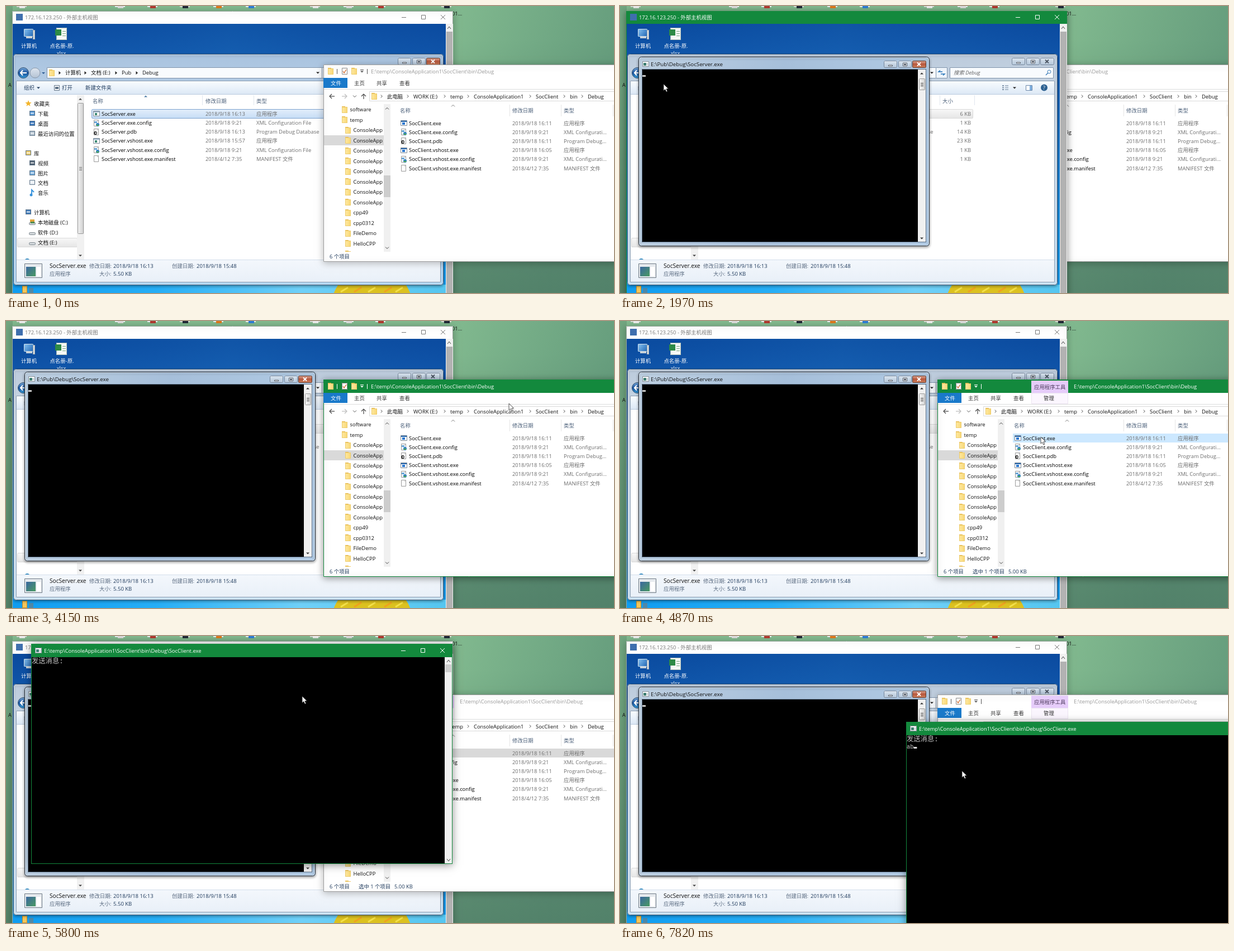
Write an HTML page with a canvas that moves like this. It is 1088 px wide and 515 px high and loops after 8000 ms.

```html
<!DOCTYPE html>
<html lang="zh-CN">
<head>
<meta charset="utf-8">
<style>
  html, body { margin: 0; width: 100%; height: 100%; overflow: hidden; background: #649a7a; }
  canvas { display: block; }
</style>
</head>
<body>
<canvas id="stage" width="1088" height="515"></canvas>
<script>
const ctx = document.getElementById('stage').getContext('2d');
const LOOP = 8000, GREEN = '#13893d';
const UI = '"Open Sans","Noto Sans CJK SC","Noto Sans CJK",sans-serif';
const MONO = '"Liberation Mono","Noto Sans CJK SC","Noto Sans CJK",monospace';

// ---- drawing helpers ----
function rect(x, y, w, h, fill, stroke, radius = 0) {
  const path = o => { ctx.beginPath(); ctx.roundRect(x + o, y + o, w - 2 * o, h - 2 * o, radius); };
  if (fill) { ctx.fillStyle = fill; path(0); ctx.fill(); }
  if (stroke) { ctx.strokeStyle = stroke; ctx.lineWidth = 1; path(.5); ctx.stroke(); }
}
function grad(x0, y0, x1, y1, ...colors) {
  const g = ctx.createLinearGradient(x0, y0, x1, y1);
  colors.forEach((c, i) => g.addColorStop(i / (colors.length - 1), c));
  return g;
}
function text(s, x, y, color = '#000', size = 9.4, align = 'left', font = UI, style = '') {
  ctx.font = `${style} ${size}px ${font}`;
  ctx.textAlign = align;
  ctx.fillStyle = color;
  ctx.fillText(s, x, y);
}
function line(color, width, ...p) {
  ctx.strokeStyle = color; ctx.lineWidth = width;
  ctx.beginPath();
  for (let i = 0; i < p.length; i += 2) ctx.lineTo(p[i], p[i + 1]);
  ctx.stroke();
}
function poly(color, ...p) {
  ctx.fillStyle = color;
  ctx.beginPath();
  for (let i = 0; i < p.length; i += 2) ctx.lineTo(p[i], p[i + 1]);
  ctx.fill();
}
function disc(x, y, r, fill, stroke) {
  ctx.beginPath(); ctx.arc(x, y, r, 0, 7);
  if (fill) { ctx.fillStyle = fill; ctx.fill(); }
  if (stroke) { ctx.strokeStyle = stroke; ctx.lineWidth = 1; ctx.stroke(); }
}
const down = (x, y, c = '#222', r = 3) => poly(c, x - r, y - r / 2, x + r, y - r / 2, x, y + r / 2);
const up = (x, y, c = '#222', r = 3) => poly(c, x - r, y + r / 2, x + r, y + r / 2, x, y - r / 2);
const right = (x, y, c = '#222') => poly(c, x - 1.5, y - 3, x + 2, y, x - 1.5, y + 3);
const chevron = (x, y, dx, dy, c = '#555') => dx
  ? line(c, 1, x - dx, y - 2.5, x + dx, y, x - dx, y + 2.5)
  : line(c, 1, x - 3, y - dy, x, y + dy, x + 3, y - dy);
function shadowed(blur, alpha, draw) {
  ctx.save();
  ctx.shadowColor = `rgba(0,0,0,${alpha})`; ctx.shadowBlur = blur; ctx.shadowOffsetY = 2;
  draw();
  ctx.restore();
}
function clipped(x, y, w, h, draw) {
  ctx.save();
  ctx.beginPath(); ctx.rect(x, y, w, h); ctx.clip();
  draw();
  ctx.restore();
}

// ---- small icons, centred vertically on y ----
function folder(x, y) {
  rect(x, y - 6, 6, 4, '#e8b84a');
  rect(x, y - 5, 10, 11, grad(x, 0, x + 10, 0, '#ffe9a2', '#f8d775'), '#eccb6b');
}
function page(x, y) {
  rect(x + 1, y - 6, 9, 12, '#fff', '#9a9a9a');
  poly('#ccc', x + 7, y - 6, x + 10, y - 3, x + 7, y - 3);
}
const fileIcons = {
  exe(x, y, modern) {
    rect(x, y - 5, 12, 10, '#fff', '#7b8794');
    rect(x + 1, y - 4, 10, 2, modern ? '#2a6ab0' : '#9db4c8');
    rect(x + 3, y - 1, modern ? 5 : 4, 4, modern ? '#2b78d0' : '#3d8a74');
  },
  config(x, y) {
    page(x, y);
    rect(x + 2, y - 3, 5, 3, '#6aa6d8');
    disc(x + 8, y + 3, 3, '#2c7fc0');
    rect(x + 6, y + 3, 4, 2, '#5bb04d');
  },
  pdb(x, y) { page(x, y); disc(x + 4, y + 2, 3, '#333'); rect(x + 3, y + 1, 3, 2, '#ddd'); },
  file: page
};
function consoleIcon(x, y) {
  rect(x, y, 12, 10, '#fff', '#7a8791');
  rect(x + 2, y + 3, 5, 5, '#3f7f73');
  rect(x + 8, y + 3, 2, 5, '#c3cbd0');
}
const fileKinds = ['exe', 'config', 'pdb', 'exe', 'config', 'file'];
const fileEnds = ['.exe', '.exe.config', '.pdb', '.vshost.exe', '.vshost.exe.config', '.vshost.exe.manifest'];
const fileDates = (built, host) => [built, '9:21', built, host, '9:21', '7:35']
  .map((s, i) => `2018/${i == 5 ? '4/12' : '9/18'} ${s}`);
const rowY = (first, i) => first + i * 16.2;

// ---- desktop behind everything ----
function desktop() {
  rect(0, 0, 1088, 515, grad(780, 0, 1088, 90, '#83bb90', '#669d7d'));
  rect(0, 0, 1088, 515, grad(0, 60, 0, 515, 'rgba(70,115,92,0)', 'rgba(74,118,98,.7)'));
  rect(0, 0, 12, 515, 'rgba(60,105,80,.25)');
  [28, 204, 262, 320, 380, 438, 553, 613, 670, 788].forEach((x, i) => {
    rect(x - 9, 0, 18, 2, i % 3 ? '#e9eef0' : '#d6d9d2');
    rect(x - 4, 0, 10, 4, ['#eee', '#ddd', '#b23a30', '#222a38', '#e07a1c', '#2f7fd8'][i % 6]);
  });
  text('A', 4, 145, '#111', 9);
  text('01...', 798, 17, '#111', 9.4);
}

// ---- remote session ----
function glassButtons(x, y, active, step = 25.7) {
  for (let i = 0; i < 3; i++) {
    const close = i == 2, bx = Math.round(x + i * step), hot = close && active;
    rect(bx, y, close ? 25 : 24, 13,
      hot ? grad(0, y, 0, y + 13, '#dcaa98', '#b8573c', '#cf8460') : grad(0, y, 0, y + 13, '#dbe5ef', '#b3c6da'),
      hot ? '#5a3a30' : '#76869a', 2);
    const cx = bx + 12, cy = y + 6.5, c = hot ? '#fff' : '#4b5563';
    if (i == 0) rect(cx - 4, cy + 1, 8, 3, '#fff', c);
    if (i == 1) { rect(cx - 4, cy - 3, 8, 7, '#fff', c); rect(cx - 2, cy - 1, 4, 3, c); }
    if (close) { line(c, 1.8, cx - 3, cy - 3, cx + 3, cy + 3); line(c, 1.8, cx + 3, cy - 3, cx - 3, cy + 3); }
  }
}
function remoteDesktop() {
  rect(12, 32, 775, 483, grad(0, 32, 0, 515, '#0a4a9e', '#1560b4', '#1a7fd2', '#1796e6', '#12a2f4'));
  rect(12, 32, 775, 483, grad(12, 0, 787, 0, 'rgba(40,130,220,0)', 'rgba(60,160,230,.12)', 'rgba(20,80,170,.1)'));
  rect(12, 500, 775, 15, grad(12, 0, 787, 0, '#0f9cf0', '#26aef6', '#6fd0f8', '#55c6f0'));
  disc(655, 541, 73, '#dcc11f');
  [606, 630, 655, 684, 704].forEach((x, i) => line(i % 2 ? '#f0a020' : '#f3e04a', 3, x - 7, 513, x + 6, 505));
  rect(29, 502, 9, 13, '#f4c65a', '#c98b22'); rect(41, 506, 8, 9, '#4d88a8');
  // icons
  rect(32, 41, 17, 14, grad(32, 41, 49, 55, '#8cc6f2', '#1d64b4'), '#d9e3ea', 1);
  rect(36, 55, 11, 3, '#c9d2d8'); rect(48, 43, 4, 17, '#dfe5e8', '#9aa5ad');
  rect(90, 39, 19, 22, '#f6f8f6', '#b4c2b4'); rect(88, 42, 11, 11, '#2d8a46');
  [45, 49, 53].forEach(y => rect(101, y, 6, 1, '#79a983'));
  text('计算机', 41, 75, '#fff', 9.4, 'center');
  text('点名册-原.', 100, 75, '#fff', 9.4, 'center');
  text('xlsx', 99, 88, '#fff', 9.4, 'center');
}
const places = [
  [0, 175, '收藏夹', '#f3b52c'], [1, 193, '下载', '#4a8fd0'], [1, 211, '桌面', '#2f6fb8'], [1, 229, '最近访问的位置', '#a9b9c8'],
  [0, 264, '库', '#e7c560'], [1, 282, '视频', '#4a5b6c'], [1, 300, '图片', '#6aa5d8'], [1, 317, '文档', '#dfe7ee'],
  [1, 335, '音乐', '#3b95dd'], [0, 370, '计算机', '#3d78b8'], [1, 388, '本地磁盘 (C:)', '#8b98a3'],
  [1, 406, '软件 (D:)', '#b8bec4'], [1, 424, '文档 (E:)', '#b8bec4']
];
function placeIcon(x, y, name, color) {
  if (name == '收藏夹') {
    ctx.fillStyle = color; ctx.beginPath();
    for (let i = 0; i < 10; i++) {
      const r = i % 2 ? 2.6 : 6, a = i * Math.PI / 5 - Math.PI / 2;
      ctx.lineTo(x + 6 + r * Math.cos(a), y + r * Math.sin(a));
    }
    ctx.fill();
  } else if (name == '音乐') {
    line(color, 2, x + 5, y + 4, x + 5, y - 5, x + 9, y - 1); disc(x + 4, y + 4, 2.5, color);
  } else if (/:\)/.test(name)) {
    rect(x, y, 12, 5, '#d5dadd', '#7f8990', 2);
    if (name[0] == '本') { rect(x + 2, y - 5, 8, 5, '#e0a53a'); rect(x + 3, y - 1, 7, 3, '#4f8b4f'); }
  } else {
    rect(x + 1, y - 5, 10, 9, color, '#65798b'); rect(x + 3, y - 2, 6, 3, 'rgba(255,255,255,.6)');
  }
}
function serverFolder(active) {
  shadowed(4, .3, () => rect(13, 86, 770, 415,
    active ? grad(0, 86, 0, 501, '#a9c3df', '#c3d8ed', '#bcd8f2', '#b4d8f5')
           : grad(0, 86, 0, 501, '#bccbdc', '#d3dfeb', '#d0e2f2', '#cbe3f5'), '#3d5a78', 5));
  rect(14, 87, 768, 413, null, 'rgba(255,255,255,.4)', 4);
  glassButtons(701, 93, active);
  // navigation
  disc(31, 120, 9.5, grad(0, 110, 0, 130, '#7fb0e0', '#174f9a', '#3aa0dc'), '#345170');
  line('#fff', 2.2, 37, 120, 26, 120); line('#fff', 2.2, 30, 115.5, 26, 120, 30, 124.5);
  disc(52, 120, 9, grad(0, 110, 0, 130, '#dfe7f0', '#b2c1d2'), '#8897a9');
  down(67, 120.5, '#2a5a92');
  rect(73, 110, 493, 20, '#f8fbfe', '#8094ab');
  rect(565, 110, 21, 20, '#eef4fa', '#8094ab');
  folder(77, 120);
  [['计算机', 106], ['文档 (E:)', 152], ['Pub', 207], ['Debug', 244]].forEach(([s, x]) => {
    right(x - 10, 120); text(s, x, 123, '#111');
  });
  down(558, 120);
  line('#2372b8', 1.4, 577, 118, 570, 118, 573, 115.5); line('#2372b8', 1.4, 574, 122, 581, 122, 578, 124.5);
  rect(590, 110, 186, 20, '#f8fbfe', '#8094ab');
  text('搜索 Debug', 597, 123, '#666', 9.4, 'left', UI, 'italic');
  disc(768, 118, 3, null, '#3b7cb8'); line('#3b7cb8', 1.5, 766, 120, 762, 124);
  // command bar
  rect(18, 134, 760, 362, '#fff', '#8c9db0');
  rect(19, 135, 758, 24, grad(0, 135, 0, 159, '#f8fbfe', '#eaf2fa', '#dbe7f4'));
  rect(19, 158, 758, 1, '#b9cade');
  text('组织', 32, 150, '#1e395b'); down(58, 147, '#1e395b');
  rect(86, 142, 10, 10, '#fff', '#5c7085'); rect(88, 145, 6, 4, '#5c7085');
  text('打开', 100, 150, '#1e395b'); text('新建文件夹', 142, 150, '#1e395b');
  for (let i = 0; i < 3; i++) { rect(684, 142 + i * 3.5, 3, 2, '#8195aa'); rect(689, 142 + i * 3.5, 6, 2, '#a9b8c8'); }
  down(706, 147, '#222'); rect(726, 142, 12, 10, '#fff', '#6a87a8'); rect(733, 143, 4, 8, '#7fb0e0');
  disc(759, 146.5, 6, '#2d6191'); text('?', 759, 150, '#fff', 9, 'center');
  // places
  rect(20, 416, 108, 17, grad(0, 416, 0, 433, '#f8f8f8', '#e5e5e5'), '#d9d9d9', 2);
  places.forEach(([deep, y, name, color]) => {
    placeIcon(deep ? 41 : 34, y, name, color);
    text(name, deep ? 57 : 50, y + 3.5, '#111');
  });
  disc(38, 458, 5, '#3c8fc4'); rect(32, 455, 14, 10, '#f1f5fb');
  rect(127, 160, 13, 295, '#f1f1f1');
  rect(128, 174, 11, 235, grad(128, 0, 139, 0, '#f4f4f4', '#cfcfcf'), '#989898', 1);
  [289, 291.5, 294].forEach(y => rect(131, y, 5, 1, '#777'));
  up(133, 167, '#444'); down(133, 448, '#444');
  // list
  up(250, 162, '#4d7ba5');
  [351, 443, 572, 634].forEach(x => rect(x, 160, 1, 18, '#e0e6ee'));
  [['名称', 155], ['修改日期', 357], ['类型', 448], ['大小', 577]].forEach(([s, x]) => text(s, x, 174, '#4c607a'));
  rect(153, 185, 479, 17, active ? grad(0, 185, 0, 202, '#e4effb', '#c5dcf5') : grad(0, 185, 0, 202, '#f8f8f8', '#e5e5e5'),
    active ? '#7da2ce' : '#d9d9d9', 2);
  const dates = fileDates('16:13', '15:57');
  const types = ['应用程序', 'XML Configuration File', 'Program Debug Database', '应用程序', 'XML Configuration File', 'MANIFEST 文件'];
  fileEnds.forEach((end, i) => {
    const y = rowY(193.3, i);
    fileIcons[fileKinds[i]](156, Math.round(y));
    text('SocServer' + end, 171, y + 3.5);
    text(dates[i], 357, y + 3.5, '#6d6d6d');
    text(types[i], 448, y + 3.5, '#6d6d6d');
    text([6, 1, 14, 23, 1, 1][i] + ' KB', 628, y + 3.5, '#6d6d6d', 9.4, 'right');
  });
  // details
  rect(19, 456, 758, 39, grad(0, 456, 0, 495, '#f3f7fc', '#e9f0f8'));
  rect(19, 455, 758, 1, '#d3deea');
  rect(33, 462, 32, 26, '#e6eaee', '#6f7a85'); rect(36, 468, 17, 17, grad(36, 468, 53, 485, '#3a67a0', '#4a9a62')); rect(55, 468, 7, 17, '#fff');
  text('SocServer.exe', 78, 469.5, '#111', 10.1);
  text('应用程序', 78, 483.5, '#5a6b80');
  [['修改日期:', 149, 469.5], ['创建日期:', 297, 469.5], ['大小:', 167, 483.5]].forEach(a => text(a[0], a[1], a[2], '#5a6b80'));
  [['2018/9/18 16:13', 192, 469.5], ['2018/9/18 15:48', 341, 469.5], ['5.50 KB', 192, 483.5]].forEach(a => text(a[0], a[1], a[2], '#1e395b', 9.5));
}
function serverConsole() {
  shadowed(4, .35, () => rect(33, 91, 521, 340, grad(33, 91, 554, 150, '#bed0e2', '#a6bfda', '#b0cae4'), '#1d2733', 5));
  rect(34, 92, 519, 338, null, 'rgba(255,255,255,.5)', 4);
  consoleIcon(40, 99);
  text('E:\\Pub\\Debug\\SocServer.exe', 55, 108, '#111', 9.7);
  glassButtons(472, 98, true);
  rect(39, 113, 509, 311, '#000', '#5c6f85');
  rect(533, 114, 14, 309, '#f0f0f0');
  rect(535, 130, 11, 21, grad(535, 0, 546, 0, '#f8f8f8', '#d3d3d3'), '#999', 1);
  [138, 140.5, 143].forEach(y => rect(538, y, 5, 1, '#555'));
  up(540, 121, '#333'); down(540, 417, '#333');
  rect(40, 124, 6, 3, '#c8c8c8');
}
function captionButtons(right, y, color) {
  rect(right - 93, y, 8, 1, color);
  rect(right - 58, y - 4, 8, 8, null, color);
  line(color, 1, right - 23, y - 4, right - 15, y + 4); line(color, 1, right - 15, y - 4, right - 23, y + 4);
}
function remoteWindow(t) {
  const active = t >= 550 && t < 3700, ink = active ? '#fff' : '#777';
  shadowed(12, active ? .4 : .25, () => rect(11, 9, 789, 520, '#fff', active ? GREEN : '#9aa89f'));
  if (active) rect(11, 9, 789, 23, GREEN);
  rect(18, 14, 12, 12, '#3f6fae');
  text('172.16.123.250 - 外部主机视图', 34, 24, ink);
  captionButtons(801, 20, ink);
  rect(787, 32, 13, 483, '#f0f0f0');
  chevron(793, 39, 0, -2, '#444');
  rect(788, 46, 11, 469, '#b2b2b2');
  clipped(12, 32, 775, 483, () => {
    remoteDesktop();
    serverFolder(t < 1570);
    if (t >= 1570) serverConsole();
  });
}

// ---- local file browser ----
function clientFolder(t) {
  const active = t >= 3700 && t < 5180, selected = t >= 4550;
  shadowed(12, active ? .4 : .25, () => rect(568, 105, 540, 354, '#fff', active ? GREEN : '#9d9d9d'));
  if (active) rect(568, 105, 520, 24, GREEN);
  const ink = active ? '#fff' : '#999', tool = active ? '#fff' : '#555';
  folder(576, 117); rect(592, 113, 1, 9, tool);
  rect(601, 111, 10, 12, '#fff', '#888'); line('#d06a2c', 1.3, 603, 117, 605, 120, 609, 114);
  folder(618, 117); down(637, 118, tool); rect(634, 114, 6, 1, tool); rect(646, 113, 1, 9, tool);
  if (selected) {
    rect(736, 107, 66, 22, '#e6ccfa'); rect(736, 129, 66, 20, '#fbf6fe', '#ece4f1');
    text('应用程序工具', 741, 121.5, '#4d3a5c'); text('管理', 758, 142, '#333');
  }
  text('E:\\temp\\ConsoleApplication1\\SocClient\\bin\\Debug', selected ? 812 : 653, 121, ink);
  rect(568, 129, 43, 18, '#1979ca');
  text('文件', 581, 141.5, '#fff');
  [['主页', 623], ['共享', 663], ['查看', 704]].forEach(([s, x]) => text(s, x, 142, '#333'));
  rect(569, 149, 519, 1, '#dcdddd');
  // address bar
  line('#444', 1.2, 588, 162, 579, 162); line('#444', 1.2, 583, 158, 579, 162, 583, 166);
  line('#bbb', 1.2, 601, 162, 610, 162); line('#bbb', 1.2, 606, 158, 610, 162, 606, 166);
  chevron(624, 162, 0, 1.5);
  line('#444', 1.2, 640, 167, 640, 158); line('#444', 1.2, 636, 162, 640, 158, 644, 162);
  rect(650, 153, 450, 18, '#fff', '#d9d9d9');
  folder(654, 162);
  [['此电脑', 682], ['WORK (E:)', 729], ['temp', 795], ['ConsoleApplication1', 837], ['SocClient', 948], ['bin', 1009], ['Debug', 1041]]
    .forEach(([s, x]) => { chevron(x - 10, 162, 1.3, 0); text(s, x, 165.5, '#111'); });
  // tree
  rect(569, 232, 107, 18, '#d9d9d9');
  clipped(569, 176, 107, 265, () => {
    ['software', 'temp', ...Array(8).fill('ConsoleApp'), 'cpp49', 'cpp0312', 'FileDemo', 'HelloCPP', ''].forEach((s, i) => {
      const y = 185.5 + i * 18.5, x = i < 2 ? 601 : 607;
      folder(x, Math.round(y));
      text(s, x + 14.5, y + 3.5, '#111');
    });
  });
  rect(676, 176, 12, 265, '#f0f0f0'); rect(676, 304, 12, 39, '#cdcdcd');
  chevron(682, 184, 0, -1.5, '#444'); chevron(682, 434, 0, 1.5, '#444');
  // list
  chevron(800, 179, 0, -1.5, '#777');
  [901, 993, 1086].forEach(x => rect(x, 177, 1, 21, '#e5e5e5'));
  [['名称', 705], ['修改日期', 906], ['类型', 998]].forEach(([s, x]) => text(s, x, 190.5, '#4c607a'));
  if (selected) rect(703, 202, 400, 16, active ? '#cce8ff' : '#d9d9d9');
  else if (t >= 4300) rect(703, 202, 400, 16, '#e5f3ff');
  const dates = fileDates('16:11', '16:05');
  const types = ['应用程序', 'XML Configurati...', 'Program Debug...', '应用程序', 'XML Configurati...', 'MANIFEST 文件'];
  fileEnds.forEach((end, i) => {
    const y = rowY(210, i);
    fileIcons[fileKinds[i]](706, Math.round(y), true);
    text('SocClient' + end, 721, y + 3.5);
    text(dates[i], 906, y + 3.5, '#6d6d6d');
    text(types[i], 998, y + 3.5, '#6d6d6d');
  });
  text('6 个项目', 579, 452.5, '#1e395b');
  if (selected) { text('选中 1 个项目', 631, 452.5, '#1e395b'); text('5.00 KB', 695, 452.5, '#1e395b'); }
}

// ---- local console ----
function clientConsole(t) {
  if (t < 5180) return;
  const W = 754, H = 395, shown = t < 5280 ? .3 : t < 5350 ? .67 : t < 5420 ? .9 : 1;
  const [cx, cy] = pointer(Math.min(Math.max(t, 6188), 6900));
  const scale = .95 + .05 * shown;
  ctx.save();
  ctx.globalAlpha = shown;
  ctx.translate(cx - 299 + W / 2, cy - 12 + H / 2);
  ctx.scale(scale, scale);
  ctx.translate(-W / 2, -H / 2);
  if (shown == 1) shadowed(14, .45, () => rect(0, 0, W, H, GREEN));
  rect(0, 0, W, 24, GREEN);
  rect(1, 24, W - 15, H - 25, '#000');
  rect(W - 14, 24, 13, H - 25, '#f0f0f0');
  rect(0, 0, W, H, null, GREEN);
  consoleIcon(7, 7);
  text('E:\\temp\\ConsoleApplication1\\SocClient\\bin\\Debug\\SocClient.exe', 23, 16, '#fff');
  captionButtons(W + 1, 12, '#fff');
  chevron(W - 7, 31, 0, -2, '#444'); chevron(W - 7, H - 7, 0, 2, '#444');
  rect(W - 13, 37, 11, 14, '#cdcdcd');
  if (t < 5420) rect(1, 34, 6, 3, '#ccc');
  else text('发送消息:', 1, 35, '#c4c4c4', 12.3, 'left', MONO);
  const typed = t < 7670 ? '' : t < 7740 ? 'a' : 'ab';
  text(typed, 1, 47.5, '#c4c4c4', 10.3, 'left', MONO);
  if (typed) rect(1 + 6.2 * typed.length, 45, 6, 3, '#ddd');
  ctx.restore();
}

// ---- pointer: [start, end, steps, evenly spaced way points] ----
const moves = [
  [70, 400, 5, [[960, 500], [311, 214]]],
  [550, 1350, 11, [[304, 212], [230, 193]]],
  [1890, 2110, 4, [[190, 172], [78, 140], [150, 130], [226, 130]]],
  [2280, 2740, 7, [[258, 130], [224, 104]]],
  [2890, 3630, 10, [[224, 104], [1032, 118]]],
  [3700, 3850, 3, [[1032, 118], [1030, 118]]],
  [4000, 4400, 6, [[1000, 122], [900, 148], [810, 171], [750, 195], [710, 212], [700, 216]]],
  [4550, 4870, 5, [[720, 214], [753, 208]]],
  [5570, 6340, 11, [[690, 180], [590, 135], [470, 80], [380, 40], [344, 26], [383, 43]]],
  [6420, 6760, 5, [[577, 114], [811, 166]]],
  [6910, 7200, 5, [[815, 165], [831, 162]]],
  [7670, 7820, 3, [[760, 188], [612, 242]]]
];
function pointer(t) {
  const move = moves.findLast(m => m[0] <= t);
  if (!move) return null;
  const [start, end, steps, way] = move;
  const step = Math.min(steps - 1, Math.floor((t - start) / (end - start) * (steps - 1) + 1e-6));
  const pos = step / (steps - 1) * (way.length - 1), i = Math.min(way.length - 2, Math.floor(pos));
  return [0, 1].map(k => Math.round(way[i][k] + (way[i + 1][k] - way[i][k]) * (pos - i)));
}
function drawPointer(p) {
  if (!p) return;
  ctx.save();
  ctx.translate(...p);
  const shape = [0, 0, 0, 12, 2.8, 9.6, 4.8, 14, 6.8, 13.2, 4.9, 8.8, 8.6, 8.6, 0, 0];
  poly('#fff', ...shape);
  line('#222', .8, ...shape);
  ctx.restore();
}

function draw() {
  const t = performance.now() % LOOP;
  desktop();
  const layers = [remoteWindow, clientFolder];
  if (t >= 550 && t < 3700) layers.reverse();
  layers.forEach(layer => layer(t));
  clientConsole(t);
  drawPointer(pointer(t));
  requestAnimationFrame(draw);
}
draw();
</script>
</body>
</html>
```
